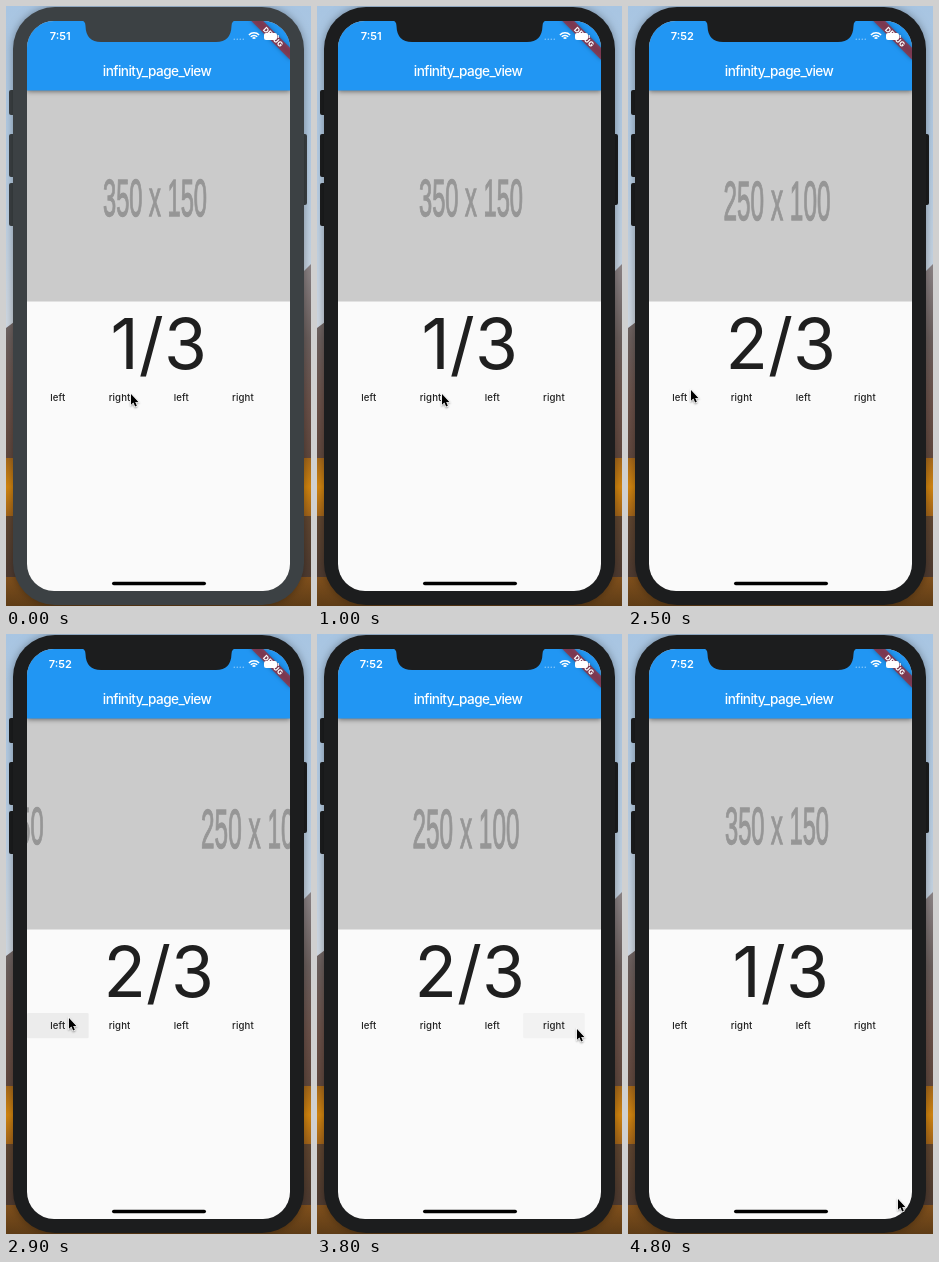
An HTML page with a canvas for the animation above (4900 ms loop, 305x600 px).

```html
<!DOCTYPE html>
<html>
<head>
<meta charset="utf-8">
<style>
html, body { margin: 0; width: 305px; height: 600px; overflow: hidden; }
canvas { display: block; }
</style>
</head>
<body>
<canvas id="stage" width="305" height="600"></canvas>
<script>
const c = document.getElementById('stage').getContext('2d');
const LOOP = 4900, LEFT = 21, TOP = 15, WIDTH = 263, UNIT = WIDTH / 375;
const UI = 'Inter, sans-serif';

// label, digit size, horizontal squeeze of the picture, vertical centre
const pages = [['350 x 150', 52, .455, 192], ['250 x 100', 56, .435, 194.5], ['150 x 50', 52, .455, 193]];
// start, duration, change of page
const moves = [[120, 300, 1], [540, 240, 1], [780, 300, 1], [1150, 300, 1],
  [2856, 300, -1], [3700, 0, 1], [4000, 0, 1], [4200, 0, 1]];
// start, end, button, darkness
const presses = [[2800, 3100, 0, .055], [3700, 4300, 3, .03]];
// time, x, y
const path = [[0, 125, 388], [1700, 125, 388], [2000, 95, 393], [2300, 63, 384],
  [3200, 63, 384], [3600, 260, 395], [4300, 260, 395], [4800, 270, 565]];

function rect(x, y, w, h, fill, r = 0) {
  c.fillStyle = fill;
  c.beginPath();
  c.roundRect(x, y, w, h, r);
  c.fill();
}

function poly(points, fill) {
  c.fillStyle = fill;
  c.beginPath();
  points.forEach(([x, y]) => c.lineTo(x, y));
  c.closePath();
  c.fill();
}

function text(s, x, y, font, fill, spacing = 0) {
  c.font = font;
  c.fillStyle = fill;
  c.letterSpacing = spacing + 'px';
  c.textAlign = 'center';
  c.fillText(s, x, y);
}

function gradient(y0, y1, ...colors) {
  const g = c.createLinearGradient(0, y0, 0, y1);
  colors.forEach((color, i) => g.addColorStop(i / (colors.length - 1), color));
  return g;
}

function pagePosition(t) {
  return moves.reduce((p, [start, dur, by]) => {
    if (t < start) return p;
    const k = dur ? Math.min(1, (t - start) / dur) : 1;
    return p + by * (1 - (1 - k) ** 3);
  }, 0);
}

function pointer(t) {
  const i = path.findIndex(([time]) => time > t);
  if (i < 0) return path[path.length - 1].slice(1);
  const [t0, x0, y0] = path[i - 1], [t1, x1, y1] = path[i];
  const k = (t - t0) / (t1 - t0);
  return [x0 + (x1 - x0) * k, y0 + (y1 - y0) * k];
}

function wallpaper() {
  rect(0, 0, 305, 600, gradient(0, 340, '#a8c5e2', '#b6cce2', '#d3dae2'));
  poly([[0, 322], [8, 316], [22, 335], [280, 290], [297, 266], [305, 258], [305, 470], [0, 470]],
    gradient(262, 470, '#8a8284', '#6b5f5d', '#6a5048', '#5c453a'));
  rect(0, 452, 305, 58, gradient(452, 510, '#a5681a', '#d2850f', '#a3651a'));
  rect(0, 510, 305, 61, gradient(510, 571, '#5f4530', '#4d3a30'));
  rect(0, 571, 305, 29, gradient(571, 600, '#80501c', '#5e3c16'));
}

function body(t) {
  const shell = t < 100 ? '#3c4144' : '#1c1d1e';
  rect(3, 84, 7, 25, shell, 2);
  rect(3, 128, 7, 43, shell, 2);
  rect(3, 177, 7, 43, shell, 2);
  rect(295, 128, 6, 71, shell, 2);
  c.save();
  c.shadowColor = 'rgba(0,0,0,.35)';
  c.shadowBlur = 8;
  rect(7, 1, 291, 598, shell, 42);
  c.restore();
  return shell;
}

function drawPage(index, x) {
  const [label, size, squeeze, y] = pages[(index % 3 + 3) % 3];
  c.save();
  c.translate(x + WIDTH / 2 - 3.5, y);
  c.scale(squeeze, 1);
  c.lineWidth = 1.4;
  c.strokeStyle = '#969696';
  text(label, 0, size * .35, `${size}px "Liberation Sans", Arial, sans-serif`, '#969696');
  c.strokeText(label, 0, size * .35);
  c.restore();
}

function carousel(p) {
  c.save();
  c.beginPath();
  c.rect(LEFT, 84, WIDTH, 211.4);
  c.clip();
  rect(LEFT, 84, WIDTH, 212, '#cbcbcb');
  const first = Math.floor(p);
  for (const i of [first, first + 1]) drawPage(i, LEFT + (i - p) * WIDTH);
  c.restore();
}

function statusBar(t) {
  text(t < 1500 ? '7:51' : '7:52', 54.3, 34, '600 11px ' + UI, '#fff');
  for (let i = 0; i < 4; i++) rect(227.5 + i * 3, 32.5, 1.6, 1.6, 'rgba(255,255,255,.45)', 1);
  c.strokeStyle = '#fff';
  c.lineWidth = 1.5;
  for (const r of [2, 4.6, 7.2]) {
    c.beginPath();
    c.arc(248, 34, r, -Math.PI * .75, -Math.PI * .25);
    c.stroke();
  }
  rect(258, 27, 13, 7, '#fff', 2);
  rect(271.6, 29, 1.2, 3, '#fff', 1);
}

function banner() {
  c.save();
  c.translate(LEFT + WIDTH, TOP - 1);
  c.rotate(Math.PI / 4);
  c.scale(UNIT, UNIT);
  c.shadowColor = 'rgba(0,0,0,.5)';
  c.shadowBlur = 4;
  rect(-40, 28, 80, 12, 'rgba(183,28,28,.63)');
  c.shadowColor = 'transparent';
  text('DEBUG', 0, 37.7, '800 10.2px ' + UI, '#fff');
  c.restore();
}

function screen(t, shell) {
  const p = pagePosition(t), page = (Math.round(p) % 3 + 3) % 3;
  c.save();
  c.beginPath();
  c.roundRect(LEFT, TOP, WIDTH, 570, 27);
  c.clip();
  rect(LEFT, TOP, WIDTH, 570, '#fafafa');
  carousel(p);
  c.save();
  c.shadowColor = 'rgba(0,0,0,.5)';
  c.shadowBlur = 5;
  c.shadowOffsetY = 1.5;
  rect(LEFT, TOP, WIDTH, 69.5, '#2196f3');
  c.restore();
  text('infinity_page_view', 151, 69.5, '500 13.6px ' + UI, '#fff', -.55);

  text(page + 1 + '/3', 152.7, 363.4, '69.5px ' + UI, '#1f1f1f');
  for (const [start, end, button, alpha] of presses) {
    if (t >= start && t < end) {
      rect(LEFT + button * 61.7, 379, 61.7, 25.3, `rgba(0,0,0,${alpha})`, 1.4);
    }
  }
  ['left', 'right', 'left', 'right'].forEach((s, i) =>
    text(s, LEFT + (i + .5) * 61.7, 395.3, '500 9.6px ' + UI, '#1f1f1f', .1));

  banner();
  statusBar(t);
  rect(106, 575.7, 94, 3.6, '#000', 2);
  c.restore();
  notch(shell);
}

function notch(shell) {
  c.fillStyle = shell;
  c.beginPath();
  c.moveTo(74, 14);
  c.quadraticCurveTo(79.5, 14.5, 79.5, 20);
  c.quadraticCurveTo(80, 36, 95, 36);
  c.lineTo(210, 36);
  c.quadraticCurveTo(225, 36, 225.5, 20);
  c.quadraticCurveTo(225.5, 14.5, 231, 14);
  c.fill();
}

function cursor(t) {
  const [x, y] = pointer(t);
  c.save();
  c.translate(x, y);
  c.scale(.86, .86);
  c.shadowColor = 'rgba(0,0,0,.3)';
  c.shadowBlur = 2;
  c.shadowOffsetY = 1;
  c.strokeStyle = '#fff';
  c.lineWidth = 1.6;
  poly([[0, 0], [0, 12.5], [2.8, 10], [4.8, 14.6], [6.8, 13.7], [4.9, 9.2], [8.6, 9.2]], '#000');
  c.stroke();
  c.shadowColor = 'transparent';
  c.fill();
  c.restore();
}

const began = performance.now();
function draw() {
  const t = Math.floor((performance.now() - began) % LOOP / 100) * 100;
  c.clearRect(0, 0, 305, 600);
  wallpaper();
  screen(t, body(t));
  cursor(t);
  requestAnimationFrame(draw);
}
draw();
</script>
</body>
</html>
```
